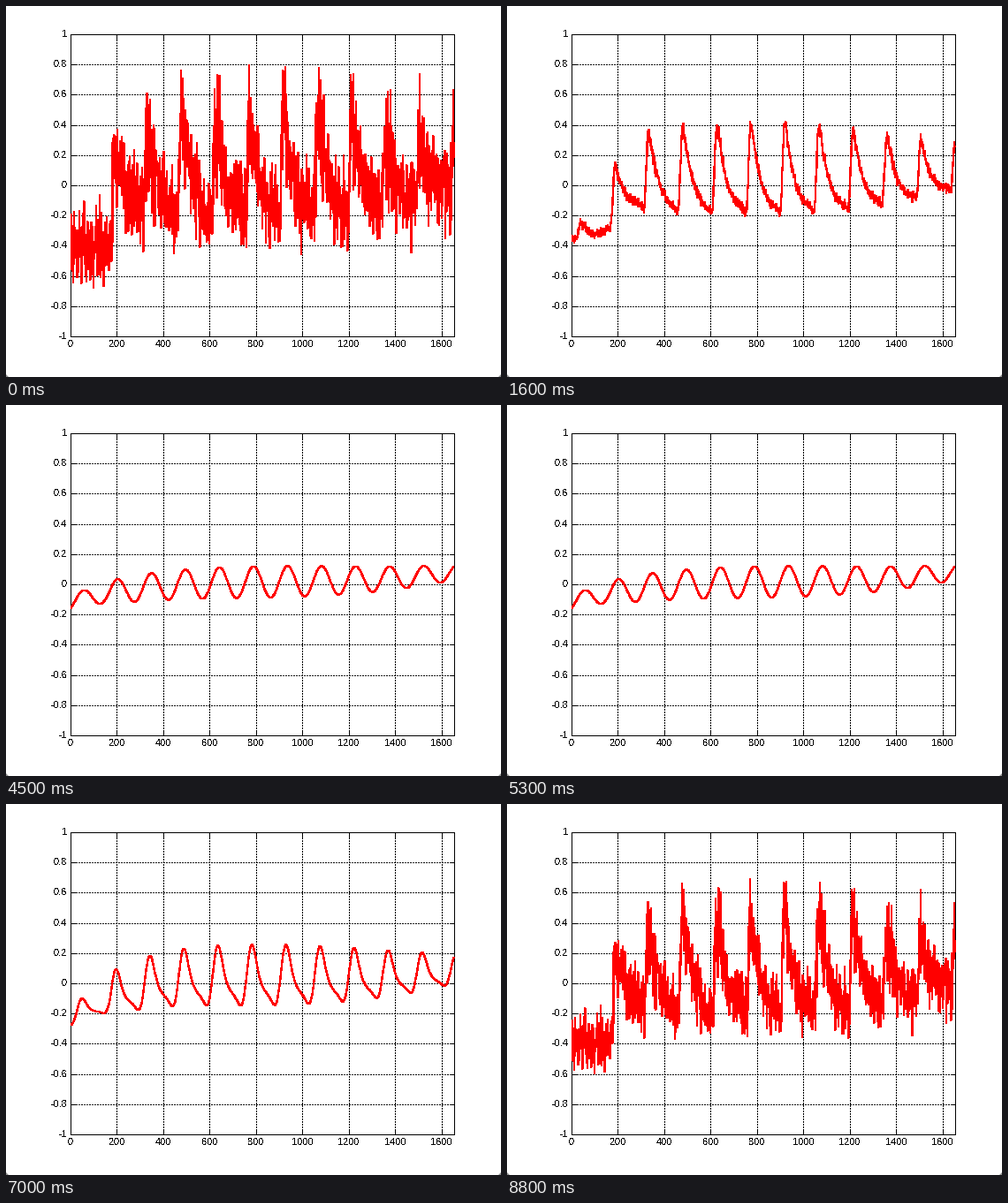
Recreate the animation shown at these times as a matplotlib script. Size 560 by 420 pixels, loop 8900 ms.

```python
import matplotlib.pyplot as plt
import numpy as np
from matplotlib.animation import FuncAnimation
from matplotlib.patches import Rectangle

W, H, DPI = 560, 420, 100
PX = 72 / DPI                      # one pixel in points
LEFT, RIGHT, TOP, BOTTOM = 73, 507, 32, 374
N = 1655
STEP_MS, FRAMES = 100, 89
HOLD, TURN, DEEPEST = 10, 49, 40   # frames held, turning frame, strongest smoothing

# Pulse train: sharp attack, exponential decay.
PERIOD, ONSET, HEIGHT = 146.9, 172, 0.9
ATTACK, DECAY = 6, 40
HARMONICS = np.arange(1, 41)

plt.rcParams.update({
    "font.family": "Liberation Sans",
    "text.antialiased": False,
    "path.simplify": False,
})

t = np.arange(N + 1.0)
omega = 2 * np.pi / PERIOD
waves = np.exp(1j * omega * np.outer(HARMONICS, t - ONSET))
coeffs = (2 * HEIGHT * DECAY / PERIOD
          / (1 + 1j * omega * DECAY * HARMONICS)
          / (1 + 1j * omega * ATTACK * HARMONICS))
envelope = 1 - 0.55 * ((t - 780) / 900) ** 2
before_first = 1 / (1 + np.exp(np.clip((t - ONSET) / 4, -50, 50)))
noise = np.clip(np.random.default_rng(12).normal(0, 0.13, t.size), -0.36, 0.36)


def drift(k):
    """Slow baseline; its initial dip gets shallower and softer with k."""
    power = 1 + 11 * np.exp(-k / 6)
    dip = 0.42 * np.exp(-k / 33) * np.exp(-(t / (195 + 2 * k)) ** power)
    return 0.02 + 0.06 * (t / N) ** 6 - dip


def pulses(k):
    """Pulse train whose higher harmonics fade as k grows."""
    cutoff = 50 / max(k, 1)
    weights = np.exp(-(HARMONICS / cutoff) ** 4 - k / 64)
    first = 1 - before_first * np.exp(-k / 20)
    return envelope * first * ((coeffs * weights) @ waves).real


def signal(k):
    """Signal after k smoothing steps."""
    p = pulses(k)
    grain = noise * (1 + 1.2 * np.maximum(p, 0)) * 0.74 ** k
    return drift(k) + p + grain


def px(x):
    return LEFT + (RIGHT - LEFT) * x / N


def py(v):
    return (TOP + BOTTOM) / 2 - (BOTTOM - TOP) / 2 * v


fig = plt.figure(figsize=(W / DPI, H / DPI), dpi=DPI, facecolor="white")
ax = fig.add_axes([0, 0, 1, 1])
ax.set(xlim=(0, W), ylim=(H, 0))
ax.axis("off")


def stroke(xs, ys, color="black", width=1, z=1, **kw):
    return ax.plot(xs, ys, color=color, lw=width * PX, zorder=z,
                   antialiased=False, solid_capstyle="butt", **kw)[0]


def label(x, y, s, ha):
    ax.text(x, y, s, ha=ha, va="baseline", fontsize=11 * PX, color="black")


# Half a pixel of phase keeps the dashes on whole pixels.
DOTS = dict(linestyle=(0.5, (2, 2)), dash_capstyle="butt")
TICK = 5

for x in range(0, 1601, 200):
    cx = px(x)
    if x:
        stroke([cx, cx], [TOP, BOTTOM], **DOTS)
    stroke([cx, cx], [TOP, TOP + TICK])
    stroke([cx, cx], [BOTTOM, BOTTOM - TICK])
    label(cx, 386, str(x), "center")

for n in range(-5, 6):
    cy = py(n / 5)
    if abs(n) < 5:
        stroke([LEFT, RIGHT], [cy, cy], **DOTS)
    stroke([LEFT, LEFT + TICK], [cy, cy])
    stroke([RIGHT, RIGHT - TICK], [cy, cy])
    label(69, cy + 3, f"{n / 5:g}".replace("\u2212", "-"), "right")

stroke([LEFT, RIGHT, RIGHT, LEFT, LEFT], [TOP, TOP, BOTTOM, BOTTOM, TOP])

# Grey window corners.
for x0, x1 in ((0, 3), (W, W - 3)):
    ax.fill([x0, x1, x0], [H, H, H - 3], color="#8c8c8c", lw=0)

# The curve runs on whole pixels and stays inside the plot box.
curve = stroke(np.round(px(t)), np.round(py(signal(0))), "red", 2, 3,
               solid_joinstyle="bevel")
curve.set_clip_path(Rectangle((LEFT, TOP), RIGHT - LEFT + 1, BOTTOM - TOP + 1,
                              transform=ax.transData))


def update(frame):
    k = 0 if frame < HOLD else DEEPEST - abs(frame - TURN)
    curve.set_ydata(np.round(py(signal(k))))
    return [curve]


anim = FuncAnimation(fig, update, frames=FRAMES, interval=STEP_MS,
                     repeat=True, repeat_delay=0, blit=False)
plt.show()
```
